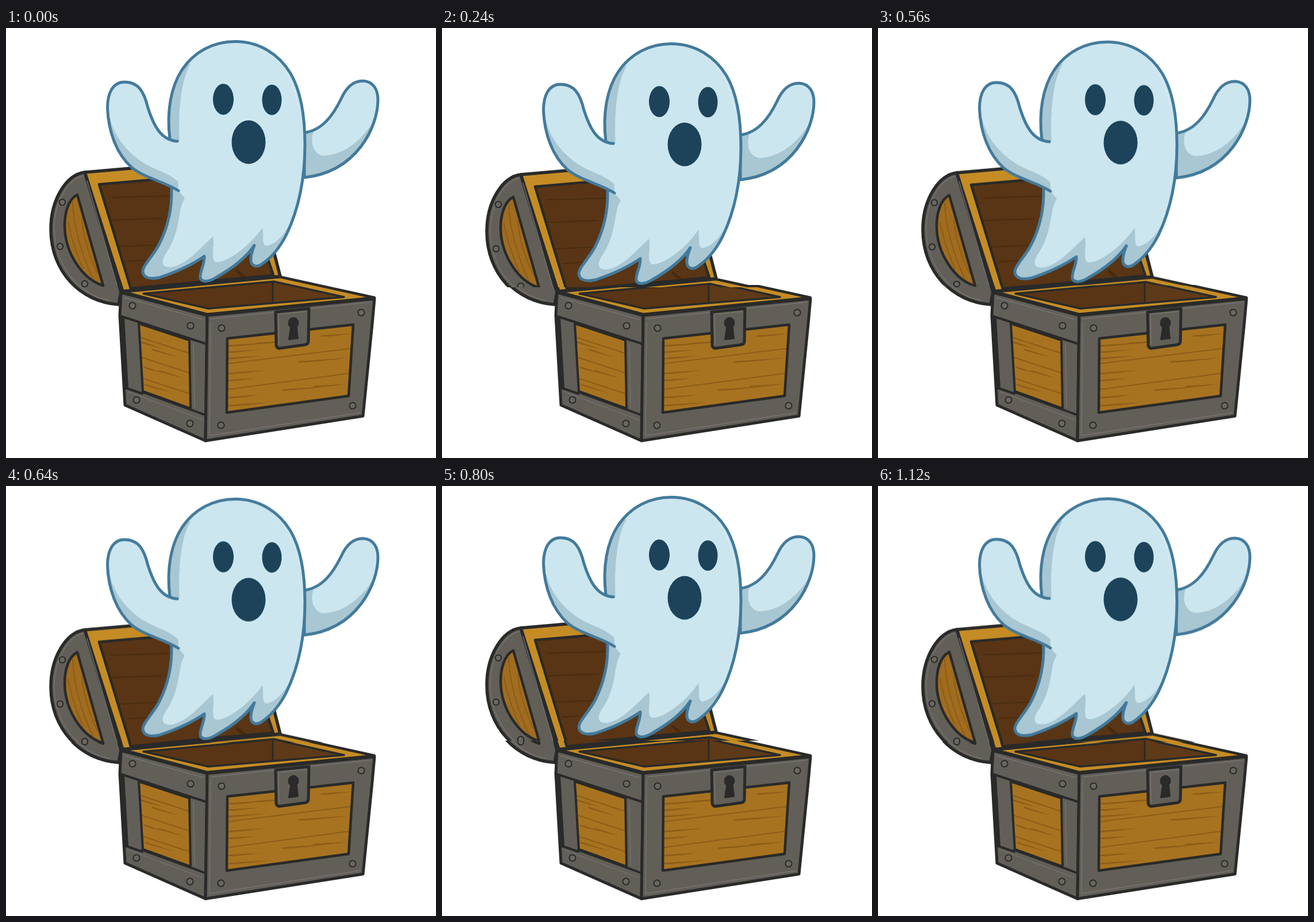
An HTML page with a canvas for the animation above (1200 ms loop, 748 px wide and 748 px high).

```html
<!DOCTYPE html>
<html lang="en">
<head>
<meta charset="utf-8">
<title>Ghost in a chest</title>
<style>
  html, body { margin: 0; width: 100%; height: 100%; overflow: hidden; background: #fff; }
  canvas { display: block; width: 748px; height: 748px; }
</style>
</head>
<body>
<canvas id="stage" width="748" height="748"></canvas>
<script>
const SIZE = 748, CUT = 447, STEP = 80, LOOP = 1200, SWING = 4;
const INK = '#292a29', GREY = '#625f59', SHEEN = '#77746d', GOLD = '#c58c25';
const WOOD = '#a77320', GRAIN = '#8d5d19', BROWN = '#593515', DEEP = '#472a10';
const PALE = '#cce6ef', SHADE = '#a8c7d3', BLUE = '#437a9b', NAVY = '#1c4359';

const art = document.createElement('canvas');
art.width = art.height = SIZE;
const g = art.getContext('2d');
g.lineJoin = g.lineCap = 'round';

function shape(d, fill, stroke, width = 4) {
  const p = new Path2D(d);
  if (fill) { g.fillStyle = fill; g.fill(p); }
  if (stroke) { g.strokeStyle = stroke; g.lineWidth = width; g.stroke(p); }
}

function line(d, color, width) { shape(d, null, color, width); }

function oval(x, y, rx, ry, fill, stroke, width = 2) {
  g.beginPath();
  g.ellipse(x, y, rx, ry, 0, 0, Math.PI * 2);
  g.fillStyle = fill;
  g.fill();
  if (stroke) { g.strokeStyle = stroke; g.lineWidth = width; g.stroke(); }
}

function bolt(x, y, r = 5.6) { oval(x, y, r, r, '#6a6761', INK, 2); }

// Draws inside the outline d only
function within(d, draw) {
  g.save();
  g.clip(new Path2D(d));
  draw();
  g.restore();
}

// Tapered streak of wood grain
function wisp(x, y, length, slope, thick = 3) {
  const ex = x + length, ey = y + length * slope;
  const mx = x + length * 0.35, my = y + length * 0.35 * slope;
  shape(`M${x} ${y - thick / 2}Q${mx} ${my - thick / 2} ${ex} ${ey}Q${mx} ${my + thick} ${x} ${y + thick / 2}Z`, GRAIN);
}

function drawLid() {
  const side = 'M137 251C105 255 78 298 78 350C78 424 130 477 196 481L200 459Z';
  const panel = 'M124 290C108 298 102 322 102 345C103 392 133 437 169 448Z';
  shape('M137 251L424 226L477 432L203 458Z', GOLD, INK, 5.5);
  shape('M162 272L405 251L465 430L217 453Z', BROWN, INK, 4.5);
  for (const [x, y, n] of [[184, 295, 100], [183, 334, 88], [198, 380, 70], [210, 406, 45]]) {
    line(`M${x} ${y}l${n} -3`, DEEP, 1.5);
  }
  shape('M401 419L419 433L411 434L399 423Z', DEEP);
  shape(side, GREY, INK, 5.5);
  line('M134 257C106 264 84 304 84 350C85 414 127 464 180 474', SHEEN, 1.3);
  line('M141 266L193 447', SHEEN, 1.3);
  shape(panel, '#a06c1f');
  within(panel, () => {
    line('M116 302C117 345 130 390 153 441', GRAIN, 2);
    line('M108 337C113 365 121 388 134 419', GRAIN, 2);
    line('M132 332C134 366 146 398 159 426', GRAIN, 2);
  });
  line(panel, INK, 4.5);
  [[98, 303], [94, 380], [137, 445]].forEach(p => bolt(...p, 5.2));
}

function drawRim() {
  shape('M203 459L477 433L641 469L350 498Z', GOLD, INK, 4.5);
  const hole = 'M239 462L466 441L588 468L352 488Z';
  shape(hole, BROWN);
  within(hole, () => {
    shape('M464 436L600 466L464 484Z', '#5f3a18');
    line('M464 440V480', INK, 3);
  });
  line(hole, INK, 3.5);
}

function drawLeftFace() {
  shape('M200 460L350 500L347 718L207 656L198 500Z', GREY, INK, 5);
  const panel = 'M231 514L319 543L321 662L238 632Z';
  shape(panel, WOOD);
  within(panel, () => {
    for (const y of [538, 572, 608]) line(`M233 ${y}L322 ${y + 29}`, GRAIN, 2);
    for (const [x, y, n] of [[234, 546, 40], [254, 559, 45], [240, 590, 34], [241, 620, 50], [266, 596, 42]]) {
      wisp(x, y, n, 0.3, 2.4);
    }
  });
  line(panel, INK, 4);
  line('M199 501L347 549M208 626L237 636M322 664L346 673M237 633L322 664', INK, 4);
  line('M203 504L210 626', INK, 6);
  line('M206 469L343 507M213 633L341 681M326 549L328 660', SHEEN, 1.3);
  [[220, 483], [321, 518], [227, 647], [320, 688]].forEach(p => bolt(...p));
}

function drawFrontFace() {
  shape('M350 500L641 471L637 515L621 675L347 718Z', GREY, INK, 5);
  line('M357 506L634 477M356 512L354 709L616 669', SHEEN, 1.4);
  const panel = 'M385 540L604 516L596 640L384 669Z';
  shape(panel, WOOD);
  within(panel, () => {
    line('M384 584L604 557M384 629L602 600', GRAIN, 2);
    const streaks = [
      [386, 553, 73], [386, 564, 55], [433, 549, 70], [386, 575, 62], [548, 536, 55],
      [386, 601, 65], [386, 613, 48], [508, 581, 90], [386, 643, 58],
      [386, 657, 75], [480, 630, 80], [535, 624, 62]
    ];
    for (const [x, y, n] of streaks) wisp(x, y, n, -0.08, 2.5);
  });
  line(panel, INK, 4.5);
  [[375, 522], [618, 495], [374, 691], [603, 657]].forEach(p => bolt(...p));
}

function drawLock() {
  shape('M469 494L527 488L526 545Q526 550 520 551L477 557Q471 558 470 552Z', GREY, INK, 5);
  line('M474 498L522 493M474 499L475 551', SHEEN, 1.4);
  shape('M496 515L505 514L508 540L492 542Z', INK, INK, 2);
  oval(500, 513, 9.5, 10, INK);
}

function drawGhost() {
  const rightArm = 'M519 182C550 178 569 152 583 123C593 101 605 92 621 92C639 93 647 107 647 125C647 170 612 250 519 260Z';
  shape(rightArm, PALE);
  within(rightArm, () => shape('M515 182L536 179C528 194 533 221 553 222C591 221 627 190 648 146L660 270H515Z', SHADE));
  line(rightArm, BLUE, 5);

  const head = 'M285 193C279 145 287 102 306 73C328 40 362 23.5 399 23.5C441 23.5 475 46 495 79C513 110 520 155 520 203C520 258 510 313 488 359C476 383 460 401 443 412C434 417 427 413 426 405C425 395 429 386 432 378';
  const tails = 'C416 402 390 420 367 433C353 442 341 443 338 435C336 426 346 410 345 397C322 413 294 425 267 434C250 438 239 434 238 424C238 412 255 398 266 377C282 346 289 314 288 279';
  const body = head + tails;
  shape(body + 'Z', PALE);
  within(body + 'Z', () => {
    shape('M270 60L321 62C304 91 299 146 302 201L270 200Z', SHADE);
    shape('M288 274L300 283L311 296C298 315 305 350 281 388C269 405 269 417 287 416C315 412 340 380 360 363C364 378 355 402 365 407C386 409 427 376 446 347C449 360 444 377 453 379C473 376 492 351 514 304L530 455H225V274Z', SHADE);
    line('M472 56C492 77 503 106 509 137', '#dceef4', 1);
  });

  // The arm has no border where it runs into the body
  const armTop = 'M298 197C268 195 256 167 247 139C240 110 230 94 206 94C186 94 176.5 113 176.5 139';
  const armLow = 'C178 180 192 219 219 243C243 262 275 267 300 283';
  const arm = armTop + armLow;
  line(body, BLUE, 5);
  shape(arm + 'L312 284V198Z', PALE);
  within(arm + 'Z', () => shape('M170 142L181 157C188 187 208 213 235 232C260 248 285 252 301 269L308 290H170Z', SHADE));
  line(arm, BLUE, 5);

  oval(378, 124, 18, 27, NAVY);
  oval(462.5, 125, 17, 26.5, NAVY);
  oval(422, 198.5, 29.5, 38, NAVY);
}

drawLid();
drawLeftFace();
drawFrontFace();
drawRim();
drawLock();
drawGhost();

const ctx = document.getElementById('stage').getContext('2d');

// Stepped bob: down, rest, up, rest, back to the middle
function bob(time) {
  const k = Math.floor((time % LOOP) / STEP);
  if (k <= 3) return SWING * k / 3;
  if (k <= 5) return SWING;
  if (k <= 10) return SWING - 2 * SWING * (k - 5) / 5;
  if (k <= 12) return -SWING;
  return -SWING * (15 - k) / 3;
}

function band(top, bottom, dy) {
  ctx.save();
  ctx.beginPath();
  ctx.rect(0, top, SIZE, bottom - top);
  ctx.clip();
  ctx.drawImage(art, 0, dy);
  ctx.restore();
}

function render(time) {
  const dy = bob(time), edge = CUT + dy;
  ctx.fillStyle = '#fff';
  ctx.fillRect(0, 0, SIZE, SIZE);
  band(Math.floor(Math.min(CUT, edge)), SIZE, 0);
  band(0, edge, dy);
}

let start;
function tick(now) {
  start ??= now;
  render(now - start);
  requestAnimationFrame(tick);
}
render(0);
requestAnimationFrame(tick);
</script>
</body>
</html>
```
